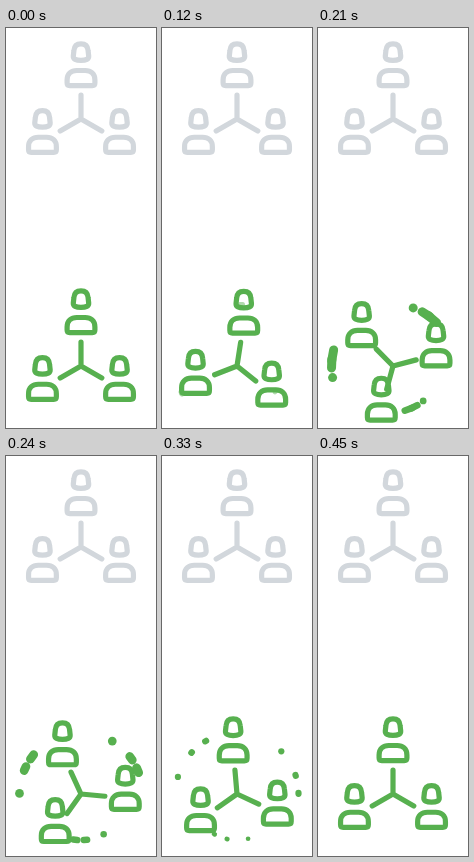
An HTML page for the animation above (0.75 s loop, 150x400 px).

```html
<!DOCTYPE html>
<html lang="en">
<head>
<meta charset="utf-8">
<title>Team network</title>
<style>
  html, body { margin: 0; width: 100%; height: 100%; overflow: hidden; background: #fff; }
  svg { display: block; width: 150px; height: 400px; }
  g { fill: none; stroke-width: 5.2; stroke-linecap: round; stroke-linejoin: round; }
  #idle { stroke: #d2d7dc; }
  #live { stroke: #57b04f; }
</style>
</head>
<body>
<svg viewBox="0 0 150 400">
  <defs>
    <g id="person">
      <path d="M0 -21.3C4.4 -21.3 6.8 -18.6 7.1 -14.5L7.7 -9C7.9 -6 5 -4.7 0 -4.7S-7.9 -6 -7.7 -9L-7.1 -14.5C-6.8 -18.6 -4.4 -21.3 0 -21.3Z"/>
      <path d="M-13.9 18V14.8C-13.9 8.8 -9.8 5.4 -4.2 5.4H4.2C9.8 5.4 13.9 8.8 13.9 14.8V18Q13.9 20.6 11.3 20.6H-11.3Q-13.9 20.6 -13.9 18Z"/>
    </g>
    <path id="spokes" d="M0 0V-24M0 0L-20.8 12M0 0L20.8 12"/>
  </defs>
  <g id="idle" transform="translate(75 91)"></g>
  <g id="live" transform="translate(75 338)"></g>
</svg>
<script>
const LOOP = 750, STEP = 30, SPIN = 450;
const ORBIT = 44.5, LIFT = -9.4;
const RINGS = [{ turn: 0, scale: 1 }, { turn: -120, scale: 1 }, { turn: 120, scale: 0.75 }];
const RING_RADIUS = 61.5;

const clamp = v => Math.min(1, Math.max(0, v));

function add(parent, tag, attrs = {}) {
  const el = document.createElementNS('http://www.w3.org/2000/svg', tag);
  for (const key in attrs) el.setAttribute(key, attrs[key]);
  return parent.appendChild(el);
}

// Angles run clockwise from straight up.
function polar(deg, radius) {
  const a = deg * Math.PI / 180;
  return [(radius * Math.sin(a)).toFixed(2), (-radius * Math.cos(a)).toFixed(2)];
}

// cubic-bezier(.74, 0, .1, 1)
function ease(x) {
  x = clamp(x);
  let lo = 0, hi = 1;
  for (let i = 0; i < 30; i++) {
    const s = (lo + hi) / 2, r = 1 - s;
    if (3 * r * r * s * 0.74 + 3 * r * s * s * 0.1 + s ** 3 < x) lo = s; else hi = s;
  }
  return lo * lo * (3 - 2 * lo);
}

function makeNetwork(root) {
  const spokes = add(root, 'use', { href: '#spokes' });
  const people = [0, 120, 240].map(() => add(root, 'use', { href: '#person' }));
  return angle => {
    spokes.setAttribute('transform', `rotate(${angle})`);
    people.forEach((p, i) => {
      const [x, y] = polar(angle + i * 120, ORBIT);
      p.setAttribute('transform', `translate(${x} ${+y + LIFT})`);
    });
  };
}

// Each drop returns the angles of its tail and head.
const slow = t => {
  const a = 3.5 + 44 * (1 - (1 - clamp((t - 180) / 220)) ** 3);
  return [a, a];
};
const fast = reach => t => [23, 14].map(lag => reach * ease((t - lag) / SPIN));
const DROPS = [slow, fast(77), fast(95)];

const live = document.getElementById('live');
makeNetwork(document.getElementById('idle'))(0);
const turnLive = makeNetwork(live);
const trail = add(live, 'g');
const drops = RINGS.flatMap(ring =>
  DROPS.map(span => ({ ring, span, el: add(trail, 'path') })));

function draw(t) {
  turnLive(120 * ease(t / SPIN));
  const size = 9 * clamp(t / 200) * (1 - clamp((t - 210) / 240) ** 1.7);
  const visible = t > 60 && t < SPIN;
  trail.setAttribute('opacity', visible ? clamp((t - 60) / 130) : 0);
  for (const { ring, span, el } of drops) {
    const [from, to] = span(t).map(a => polar(a + ring.turn, RING_RADIUS * ring.scale));
    el.setAttribute('d', `M${from}L${to}`);
    el.setAttribute('stroke-width', size * ring.scale);
  }
}

const start = performance.now();
function tick() {
  const t = (performance.now() - start) % LOOP;
  draw(Math.floor((t + 0.5) / STEP) * STEP % LOOP);
  requestAnimationFrame(tick);
}
tick();
</script>
</body>
</html>
```
